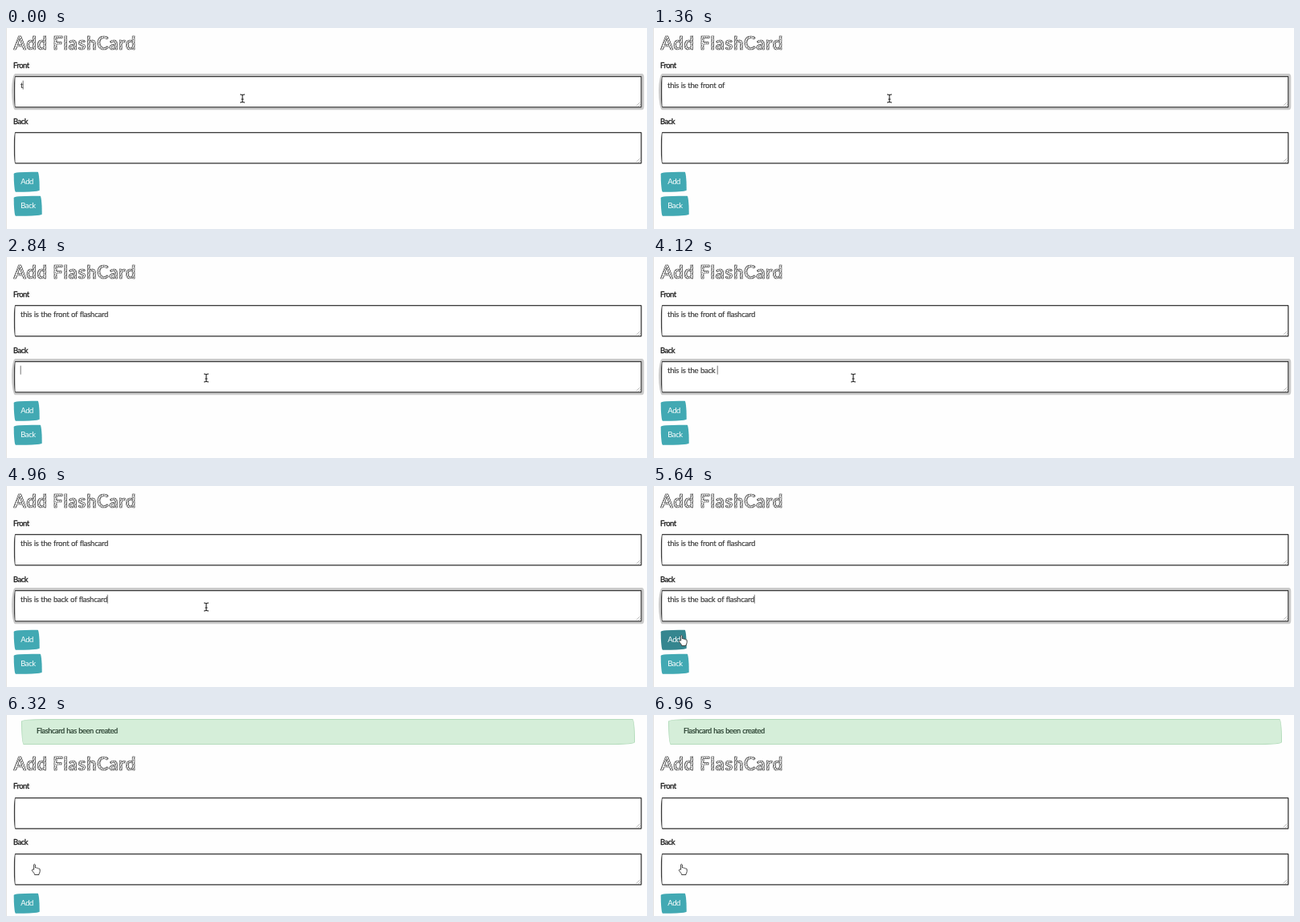
Animation of 797x251 px, one loop 7000 ms. Source, as an HTML page:

```html
<!DOCTYPE html>
<html lang="en">
<head>
<meta charset="utf-8">
<title>Add FlashCard</title>
<style>
  html, body { margin: 0; width: 100%; height: 100%; overflow: hidden; background: #fefefe; }
  body {
    position: relative;
    font: 9.5px/14px Lato, "Open Sans", sans-serif;
    letter-spacing: -.25px;
    word-spacing: .5px;
    color: #3c3c3c;
    --sketch: 170px 17px 150px 17px / 17px 150px 17px 170px;
  }
  body::before { content: ""; position: absolute; inset: 0 auto 0 0; width: 1px; background: #e2e2e2; }
  #page, #page > *, #alert, #alert span, .text, .grip, #cursor { position: absolute; }
  #page { left: 0; top: 0; width: 797px; height: 251px; }
  h1 {
    left: 9.5px; top: 5.5px; margin: 0; white-space: nowrap;
    font: bold 22px/26px Lato, "Open Sans", sans-serif;
    letter-spacing: .75px;
    color: transparent;
    -webkit-text-stroke: .7px #4b4b4b;
    background: repeating-linear-gradient(115deg, #f4f4f4 0 1.4px, #8a8a8a 1.4px 2.2px);
    -webkit-background-clip: text; background-clip: text;
  }
  label { left: 9px; color: #1c1c1c; letter-spacing: -.5px; -webkit-text-stroke: .3px #1c1c1c; }
  .field, .btn { transform: translate(-.3px, -.3px); }
  .field {
    left: 10px; width: 781px; height: 40px; background: #fff;
    border-radius: 2px 1px 1px 2px / 18px 2px 2px 20px;
    box-shadow: inset 0 0 0 1.5px #383838, 0 0 0 2.6px rgba(51, 51, 51, calc(var(--ring, 0) * .25));
  }
  .text { left: 8.3px; top: 5px; white-space: pre; -webkit-text-stroke: .2px; }
  .caret { display: inline-block; width: 1px; height: 11px; margin-right: -1px; vertical-align: -2px; background: #777; }
  .grip {
    right: 2px; bottom: 2px; width: 5px; height: 5px;
    background: linear-gradient(135deg, transparent 45%, #bbb 45% 55%, transparent 55% 72%, #bbb 72% 82%, transparent 82%);
  }
  .btn {
    left: 10px; height: 25px; box-sizing: border-box; padding-left: 8.5px;
    line-height: 24px; letter-spacing: -.4px; color: #fff; background: #42a9b3;
    border-radius: var(--sketch);
    box-shadow: 0 0 0 2.4px rgba(66, 169, 179, calc(var(--ring, 0) * .5));
  }
  .btn.hover { background: #35868f; }
  #alert {
    left: 19px; top: 5px; width: 762.5px; height: 32px; box-sizing: border-box;
    border: 1px solid #b4dcbc; background: #d5eed9; border-radius: var(--sketch);
  }
  #alert span { left: 18px; top: 7.4px; font-size: 9.2px; letter-spacing: -.38px; white-space: nowrap; color: #233a2a; -webkit-text-stroke: .2px; }
  #cursor { left: 0; top: 0; width: 18px; height: 18px; overflow: visible; }
</style>
</head>
<body>
<div id="alert"><span>Flashcard has been created</span></div>
<div id="page">
  <h1>Add FlashCard</h1>
  <label style="top:39.6px">Front</label>
  <div class="field" id="front" style="top:60px"><span class="text"><span class="typed"></span><i class="caret"></i></span><i class="grip"></i></div>
  <label style="top:109.6px">Back</label>
  <div class="field" id="back" style="top:130px"><span class="text"><span class="typed"></span><i class="caret"></i></span><i class="grip"></i></div>
  <div class="btn" id="add" style="top:180px;width:31.5px">Add</div>
  <div class="btn" style="top:210px;width:34.5px">Back</div>
</div>
<svg id="cursor">
  <path id="beam" fill="none" stroke="#222" stroke-width="1.1" d="M-3-5Q-.5-5 0-4Q.5-5 3-5M0-4V4M-3 5Q-.5 5 0 4Q.5 5 3 5M-1.5 1H1.5"/>
  <path id="arrow" fill="#111" stroke="#fff" stroke-width=".7" d="M0 0V11L2.6 8.6L4.2 12.3L6 11.5L4.4 8H8Z"/>
  <path id="hand" fill="#fff" stroke="#333" stroke-width=".9" stroke-linejoin="round"
    d="M-2.6 1V-5.2Q-1.8-7-.8-5.2V-1.4Q.5-2.2 1.2-.9Q2.5-1.6 3.2-.4Q4.8-.8 5 .8V3.2Q4.8 5 3.8 6V7.3H-1.6V6.2L-4.8 2.2Q-5 .4-3.5.6Z"/>
</svg>
<script>
  const LOOP = 7000, STEP = 40;
  const FOCUS_BACK = 2720, PRESS = 5840, SAVED = 6320;
  const $ = id => document.getElementById(id);
  const clamp = v => Math.max(0, Math.min(1, v));
  const ease = v => v * v * (3 - 2 * v);
  const fade = (t, from) => clamp((t - from) / 120);
  const between = (t, a, b) => t >= a && t < b;

  // Typing rhythm: [time, characters typed]
  const fields = {
    front: {
      text: "this is the front of flashcard",
      keys: [[0, 1], [720, 14], [920, 21], [1480, 21], [1520, 22], [1920, 30]],
      ring: t => 1 - fade(t, FOCUS_BACK),
      caret: t => t < 2440 && !between(t, 1360, 1520)
    },
    back: {
      text: "this is the back of flashcard",
      keys: [[3080, 0], [3120, 1], [3640, 12], [3760, 12], [3800, 13], [4120, 17], [4400, 20], [4480, 20], [4520, 21], [4960, 29]],
      ring: t => fade(t, FOCUS_BACK) - fade(t, PRESS),
      caret: t => between(t, FOCUS_BACK, PRESS)
    }
  };

  // Pointer path: [time, x, y]
  const path = [[0, 294, 88], [2400, 294, 88], [2700, 249, 151], [5240, 249, 151], [5600, 37.2, 192.2]];

  function sample(points, t, curve = v => v) {
    const i = points.findIndex(p => p[0] > t);
    if (i < 0) return points[points.length - 1].slice(1);
    if (i === 0) return points[0].slice(1);
    const a = points[i - 1], b = points[i];
    const k = curve((t - a[0]) / (b[0] - a[0]));
    return a.slice(1).map((v, n) => v + (b[n + 1] - v) * k);
  }

  function pointerShape(x, y) {
    if (between(y, 59, 100) || between(y, 129, 170)) return "beam";
    return x < 42 && y > 179 ? "hand" : "arrow";
  }

  function render(t) {
    const saved = t >= SAVED;
    $("alert").style.display = saved ? "" : "none";
    $("page").style.top = saved ? "42.5px" : "0";

    for (const [id, field] of Object.entries(fields)) {
      const box = $(id);
      const count = saved ? 0 : Math.floor(sample(field.keys, t)[0] + 1e-6);
      box.querySelector(".typed").textContent = field.text.slice(0, count);
      box.querySelector(".caret").style.visibility = !saved && field.caret(t) ? "visible" : "hidden";
      box.style.setProperty("--ring", saved ? 0 : field.ring(t));
    }

    const [x, y] = sample(path, t, ease);
    const shape = pointerShape(x, y);
    for (const id of ["beam", "arrow", "hand"]) $(id).style.display = id === shape ? "" : "none";
    $("cursor").style.transform = `translate(${x}px, ${y}px)`;

    $("add").classList.toggle("hover", shape === "hand" && !saved);
    $("add").style.setProperty("--ring", saved ? 0 : fade(t, PRESS + 40));
  }

  const start = performance.now();
  function tick() {
    const t = (performance.now() - start) % LOOP;
    render(Math.floor(t / STEP) * STEP);
    requestAnimationFrame(tick);
  }
  tick();
</script>
</body>
</html>
```
